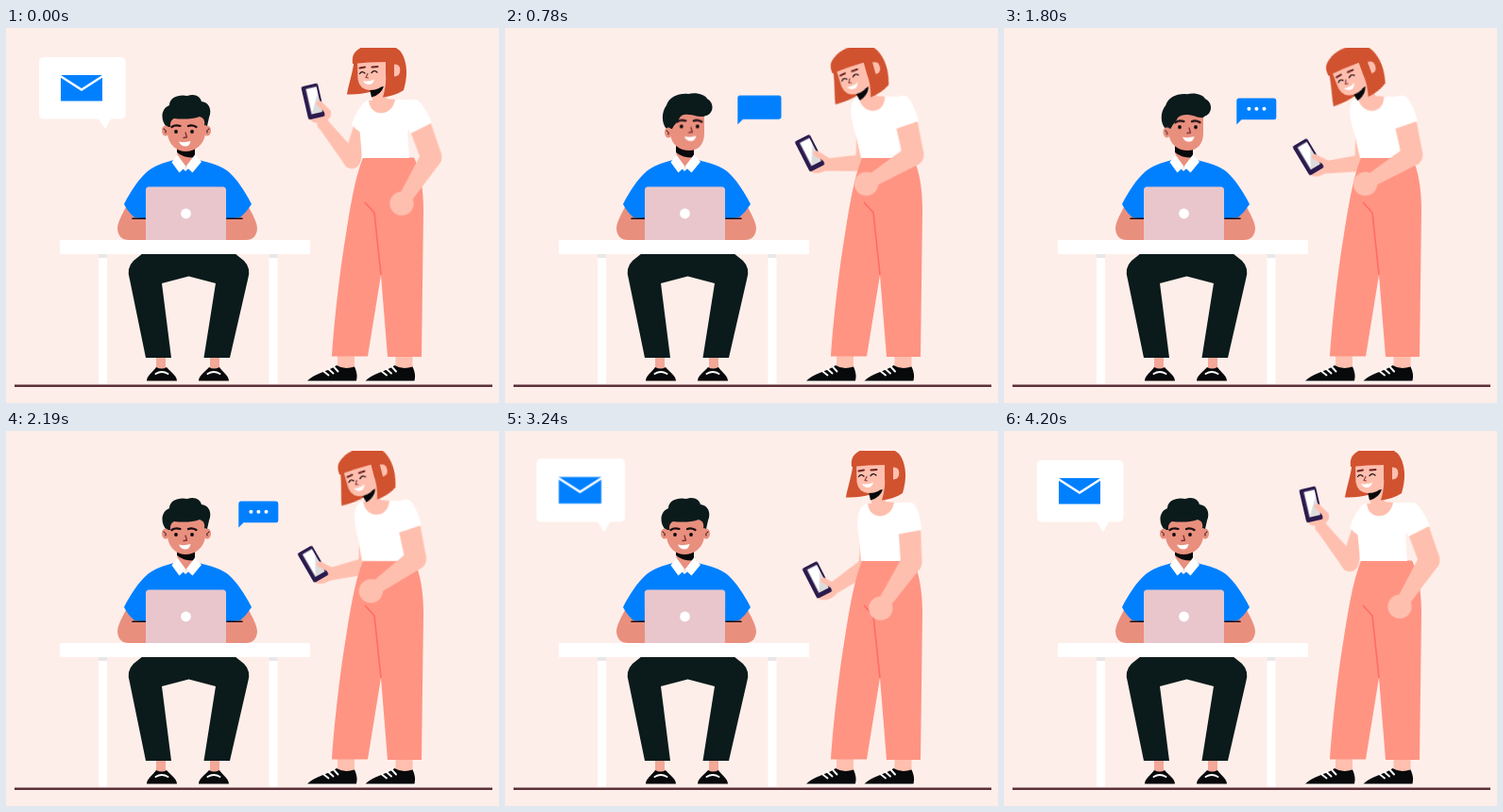
Recreate the animation shown at these times as an HTML page. Size 522 by 398 pixels, loop 4.5 s.

```html
<!DOCTYPE html>
<html lang="en">
<head>
<meta charset="utf-8">
<title>Two people messaging</title>
<style>
html, body { margin: 0; width: 100%; height: 100%; overflow: hidden; background: #feeee9; }
svg { display: block; width: 100vw; height: 100vh; }
.white { fill: #fff; }
.blue { fill: #0080ff; }
.ink { fill: #08090b; }
.dark { fill: #0b1a1b; }
.tan { fill: #e98f7e; }
.skin { fill: #ffbfae; }
.hair { fill: #d1522f; }
.line { fill: none; stroke: #1a0d12; stroke-width: 1.6; stroke-linecap: round; stroke-linejoin: round; }
.lace { fill: none; stroke: #fff; stroke-width: 1.9; stroke-linecap: round; }

.mail, .chat, .dot, .head, .torso, .armR, .foreR, .armL, .foreL, .phone,
.look, .hairM, .faceM, .earL, .earR, .lid, .cuff {
  animation: 4.5s ease-in-out infinite;
}

/* speech bubbles */
.mail { animation-name: mail; transform-origin: 102px 100px; }
@keyframes mail {
  0%, 7% { transform: scale(1); }
  12.4% { transform: scale(1.1); animation-timing-function: ease-in; }
  16.5%, 66.5% { transform: scale(0); animation-timing-function: ease-out; }
  73.5% { transform: scale(1.1); }
  86%, 100% { transform: scale(1); }
}
.chat { animation-name: chat; transform-origin: 246px 103px; }
@keyframes chat {
  0%, 13% { transform: scale(0); animation-timing-function: ease-out; }
  17.3% { transform: scale(1.1); }
  23%, 61% { transform: scale(1); }
  64% { transform: scale(1.1); animation-timing-function: ease-in; }
  67.5%, 100% { transform: scale(0); }
}
.dot { animation-name: dot; animation-fill-mode: backwards; transform-box: fill-box; transform-origin: center; }
.dot:nth-of-type(2) { animation-delay: 80ms; }
.dot:nth-of-type(3) { animation-delay: 160ms; }
@keyframes dot {
  0%, 20.5% { transform: scale(0); }
  23.5%, 100% { transform: scale(1); }
}

/* woman */
.head { animation-name: head; transform-origin: 395px 65px; }
@keyframes head {
  0%, 4% { transform: translate(0px, 0px) rotate(0deg); }
  17.4% { transform: translate(-14px, 1.5px) rotate(-16deg); }
  28%, 40% { transform: translate(-16px, 1.5px) rotate(-20deg); animation-timing-function: ease-in; }
  48.7% { transform: translate(-8px, .5px) rotate(-14.5deg); animation-timing-function: ease-out; }
  57.8%, 100% { transform: translate(0px, 0px) rotate(0deg); }
}
.torso { animation-name: torso; transform-origin: 0 138px; }
@keyframes torso {
  0%, 4.4% { transform: skewX(0deg) scaleY(1); }
  17.4%, 40% { transform: skewX(8.5deg) scaleY(1.05); animation-timing-function: ease-in; }
  48.7% { transform: skewX(5.5deg) scaleY(1.03); animation-timing-function: ease-out; }
  57.8%, 100% { transform: skewX(0deg) scaleY(1); }
}
.armR { animation-name: armR; }
@keyframes armR {
  0%, 4.4%, 92.5%, 100% { transform: translate(434px, 90px) rotate(-18.8deg); }
  17.4%, 40% { transform: translate(422.5px, 86px) rotate(-11deg); animation-timing-function: ease-in; }
  48.7% { transform: translate(424.5px, 87px) rotate(-10.5deg); animation-timing-function: ease-out; }
  57.8%, 73% { transform: translate(428px, 90px) rotate(-2.3deg); }
}
.foreR { animation-name: foreR; }
@keyframes foreR {
  0%, 4.4%, 92.5%, 100% { transform: translate(0px, 50px) rotate(51.2deg); }
  17.4%, 40% { transform: translate(0px, 50px) rotate(69.5deg); animation-timing-function: ease-in; }
  48.7% { transform: translate(0px, 50px) rotate(65px); transform: translate(0px, 50px) rotate(65deg); animation-timing-function: ease-out; }
  57.8%, 73% { transform: translate(0px, 50px) rotate(36deg); }
}
.armL { animation-name: armL; }
@keyframes armL {
  0%, 4.4%, 92.5%, 100% { transform: translate(380px, 92px) rotate(16deg); }
  17.4%, 40% { transform: translate(380.5px, 93px) rotate(0deg); animation-timing-function: ease-in; }
  48.7% { transform: translate(383px, 93px) rotate(1deg); animation-timing-function: ease-out; }
  57.8%, 73% { transform: translate(386px, 93px) rotate(3deg); }
}
.foreL { animation-name: foreL; }
@keyframes foreL {
  0%, 4.4%, 92.5%, 100% { transform: translate(0px, 50px) rotate(125.5deg); }
  17.4% { transform: translate(0px, 50px) rotate(87deg); }
  28%, 40% { transform: translate(0px, 50px) rotate(83deg); animation-timing-function: ease-in; }
  48.7% { transform: translate(0px, 50px) rotate(76deg); animation-timing-function: ease-out; }
  57.8%, 73% { transform: translate(0px, 50px) rotate(53deg); }
}
.phone { animation-name: phone; }
@keyframes phone {
  0%, 4.4%, 92.5%, 100% { transform: translate(-6.5px, 74.2px) rotate(-154.5deg); }
  17.4%, 40% { transform: translate(-13.2px, 57.2px) rotate(-114deg); animation-timing-function: ease-in; }
  48.7% { transform: translate(-14.5px, 55.2px) rotate(-107deg); animation-timing-function: ease-out; }
  57.8%, 73% { transform: translate(-17px, 52.3px) rotate(-83deg); }
}

/* man */
.look { animation-name: look; }
@keyframes look {
  0%, 6.7%, 48%, 100% { transform: translate(0px, 0px); }
  16%, 37.5% { transform: translate(6.8px, -5.5px); }
}
.earL { animation-name: earL; }
@keyframes earL {
  0%, 6.7%, 48%, 100% { transform: translate(0px, 0px); }
  16%, 37.5% { transform: translate(4px, 2px); }
}
.earR { animation-name: earR; }
@keyframes earR {
  0%, 6.7%, 48%, 100% { transform: translate(0px, 0px); }
  16%, 37.5% { transform: translate(-8px, -2px); }
}
.faceM { animation-name: faceM; }
@keyframes faceM {
  0%, 6.7%, 48%, 100% { d: path("M171 92L171 112C172 124 181 131 190 131C200 131 210 124 211 112L211 92Z"); }
  16%, 37.5% { d: path("M174 92L175 112C176 124 185 130 195 130C206 130 211 122 211 112L211 88Z"); }
}
.hairM { animation-name: hairM; }
@keyframes hairM {
  0%, 6.7%, 48%, 100% { d: path("M170 105C164 99 163 86 173 82C173 73 184 70 192 72C200 69 206 73 207 78C216 79 218 88 215 95L213 104L210 103C211 98 209 95 205 94C198 97 186 97 178 96C174 98 174 101 174 105Z"); }
  16%, 37.5% { d: path("M171 107C166 102 165 90 171 82C174 73 184 69 194 70C203 68 212 71 214 75C222 79 221 91 213 93L210 94L207 94C203 94 199 92 195 92C190 91 187 92 185 95C183 100 180 101 177 107Z"); }
}
.lid { animation-name: lid; }
@keyframes lid {
  0%, 49%, 74.5%, 100% { d: path("M148 172Q148 168.500 151.500 168.500L229.500 168.500Q233 168.500 233 172L233 225L148 225Z"); }
  57.5%, 62% { d: path("M145.500 173Q145.500 169.500 149 169.500L232 169.500Q235.500 169.500 235.500 173L232 224L149 224Z"); }
}
.cuff { animation-name: cuff; transform-origin: 134px 202px; }
@keyframes cuff {
  0%, 49%, 74.5%, 100% { transform: rotate(0deg); }
  57.5%, 62% { transform: rotate(-4deg); }
}
</style>
</head>
<body>
<svg viewBox="0 0 522 398" preserveAspectRatio="none">
  <defs>
    <clipPath id="crop"><rect y="21" width="522" height="377"/></clipPath>
    <g id="seatShoe">
      <path fill="#f3a898" d="M159 348h10v15h-10z"/>
      <path class="ink" d="M149 374.500C149 369 156 365 159 360Q165 363 170 360C174 365 181 369 181 374.500Z"/>
      <path class="lace" d="M158.500 367Q165 363 171.500 367"/>
    </g>
    <g id="walkShoe">
      <path class="skin" d="M351 347h18v16h-18z"/>
      <path class="white" d="M319 374h53v1.500h-53z"/>
      <path class="ink" d="M319 374.500C326 367 340 365 350 358Q358 363 369 359.500C372 366 372 370 371 374.500Z"/>
      <path class="lace" d="M336.500 364.500l5 4M341.500 362l5 4.500M347 359.500l4.500 5"/>
    </g>
    <path id="manArm" class="tan" d="M127 190C124 196 118 206 118 213Q119 225 130 225H152V198Z"/>
    <path id="cuffLine" class="line cuff" d="M134 202.200H150"/>
  </defs>

  <path d="M9 379.700H515" stroke="#5c3038" stroke-width="2.400"/>

  <!-- mail bubble -->
  <g class="mail">
    <path class="white" d="M40 31H121Q126.500 31 126.500 36.500V91Q126.500 96.500 121 96.500H111L106 105.500Q105 107 104 105.500L98 96.500H40Q35 96.500 35 91V36.500Q35 31 40 31Z"/>
    <rect class="blue" x="58" y="50" width="44" height="27.500"/>
    <path d="M57.500 51L80 65.500L102.500 51" fill="none" stroke="#fff" stroke-width="2.400"/>
  </g>

  <!-- chat bubble -->
  <g class="chat">
    <path class="blue" d="M248.500 74.500H286Q288.300 74.500 288.300 77V95Q288.300 97.300 286 97.300H251.500L246.300 102.500V77Q246.300 74.500 248.500 74.500Z"/>
    <circle class="dot white" cx="259.400" cy="85.800" r="2"/>
    <circle class="dot white" cx="267.400" cy="85.800" r="2"/>
    <circle class="dot white" cx="275.500" cy="85.800" r="2"/>
  </g>

  <!-- seated man -->
  <use href="#seatShoe"/>
  <use href="#seatShoe" transform="translate(385 0) scale(-1 1)"/>
  <path class="dark" d="M145 239L135 247Q127 255 131 267L148 350H175L165 271L193.500 263.500L222 271L209.500 350H237L256 267Q260 255 252 247L242 239Z"/>

  <use href="#manArm"/>
  <use href="#manArm" transform="translate(384 0) scale(-1 1)"/>
  <path class="blue" d="M178 140C166 143 156 147 150 152C140 161 132 173 125 187Q129 195 136 201L150 203H232L248 201Q255 195 260 187C253 173 245 161 235 152C229 147 217 143 204 140L190 152Z"/>
  <use href="#cuffLine"/>
  <use href="#cuffLine" transform="translate(384 0) scale(-1 1)"/>

  <path class="tan" d="M181.500 118H200V137L190.500 148L181.500 137Z"/>
  <path class="ink" d="M181 125H200V137.500Q188 138 181 132Z"/>
  <path class="white" d="M181.500 134.500L175.500 142.500L183.500 153.500L190.500 147ZM200 134.500L207 142L197.500 153.500L190.500 147Z"/>

  <g class="earR">
    <ellipse class="tan" cx="213" cy="109" rx="4" ry="5.500"/>
    <path class="line" style="stroke-width:1" d="M215 107Q212 108 213 111"/>
  </g>
  <path class="faceM tan" d="M171 92L171 112C172 124 181 131 190 131C200 131 210 124 211 112L211 92Z"/>
  <g class="look">
    <path class="line" style="stroke-width:2.200" d="M175.500 105Q179 102.500 184.500 104M193 104Q197 102.500 201.500 105"/>
    <circle class="ink" cx="180" cy="110" r="1.900"/>
    <circle class="ink" cx="197" cy="110" r="1.900"/>
    <path class="line" style="stroke:#7a2f36;stroke-width:1.300" d="M190 111L191.500 116L188 116.500"/>
    <path class="white" d="M183 120.500Q189 122 195.500 120Q194.500 125.500 190 125.500Q185 125.500 183 120.500Z"/>
  </g>
  <path class="hairM dark" d="M170 105C164 99 163 86 173 82C173 73 184 70 192 72C200 69 206 73 207 78C216 79 218 88 215 95L213 104L210 103C211 98 209 95 205 94C198 97 186 97 178 96C174 98 174 101 174 105Z"/>
  <g class="earL">
    <ellipse class="tan" cx="169" cy="109" rx="4" ry="5.500"/>
    <path class="line" style="stroke-width:1" d="M167 107Q170 108 169 111"/>
  </g>

  <!-- desk and laptop -->
  <path class="white" d="M57 225H322V240H57ZM98 240h9V378h-9zM278.500 240h9V378h-9z"/>
  <path fill="#e9e7e7" d="M98 240h9v4h-9zM278.500 240h9v4h-9z"/>
  <path class="lid" fill="#e8c6cc" d="M148 172Q148 168.500 151.500 168.500L229.500 168.500Q233 168.500 233 172L233 225L148 225Z"/>
  <circle class="white" cx="190.500" cy="197" r="5.400"/>

  <!-- standing woman -->
  <g clip-path="url(#crop)">
    <g class="armL">
      <path class="skin" d="M-8 10H8L9 50H-9Z"/>
      <path class="white" d="M-3 -12Q-10 -4 -10.500 14Q-2 20 9 20L10 -10Z"/>
      <g class="foreL">
        <circle class="skin" r="9.300"/>
        <path class="skin" d="M-9 0L-6 50H6L9 0Z"/>
        <circle class="skin" cy="49" r="6.500"/>
        <g class="phone">
          <ellipse class="skin" cx="4" cy="16.500" rx="11.500" ry="7.500"/>
          <rect x="-9" y="-18" width="18" height="36" rx="2" fill="#2b1b4d"/>
          <rect class="white" x="-4.500" y="-14.500" width="11.500" height="27.500"/>
          <path fill="#dcdcdc" d="M7 -8V13H-4.500Z"/>
          <path d="M6 3.500L13 14.500" stroke="#ffbfae" stroke-width="6" stroke-linecap="round"/>
        </g>
      </g>
    </g>

    <use href="#walkShoe"/>
    <use href="#walkShoe" x="61.500"/>
    <path fill="#ff9483" d="M378 137.500H432C439 151 442 172 442 193L440 349H404L397 262L383 348.500H345C348 305 354 255 359 225C364 193 369 160 378 137.500Z"/>
    <path d="M380 185L390 196L397 262" fill="none" stroke="#ff6c63" stroke-width="1.600"/>

    <g class="torso">
      <path class="skin" d="M387 58L403 56V75L413 76Q410 92 397 92Q386 92 384 77L388 77Z"/>
      <path class="white" d="M384 76.500C385 95 409 95 412 76L430 76Q436 82 434 95L425 110L427 138H377L375 114Q371 92 376 83Q378 78.500 384 76.500Z"/>
    </g>

    <g class="head">
      <path class="hair" d="M369 30C368 46 363 58 361 70.500Q375 71 387 67.500L382 30Z"/>
      <path class="ink" d="M385 64.500L400 62Q397 71 387 73.500Z"/>
      <path class="skin" d="M372 34H404L402 57Q397 66 385 66Q374 65 372.500 54Z"/>
      <path class="line" style="stroke:#6b2426;stroke-width:2" d="M374.500 42.500L380 41.500M387.500 41.500L393.500 41"/>
      <path class="line" style="stroke-width:1.200" d="M374.500 48.500Q377 45 380 48M387 47.500Q390 44 393 47"/>
      <path class="line" style="stroke:#8d3b3c;stroke-width:1.200" d="M383 48.500L381 52.500L383.500 53"/>
      <path class="white" d="M378 56Q384 57.500 390 54.500Q388.500 60 384 60Q380 60 378 56Z"/>
      <path class="hair" d="M367 38C366 29 369 25 374 22C384 14 406 14 417 24C425 34 426 50 421 66Q412 72 399 73.500Q403 60 402 50L402 36Q384 36 367 38Z"/>
      <path class="skin" d="M411 38.500Q417.500 38 417.300 45Q417 51.500 411 51.500Z"/>
    </g>

    <g class="armR">
      <path class="skin" d="M-12 12H11.500V50H-11Z"/>
      <path class="white" d="M-12 -10Q0 -18 6 -12Q11 -4 12.700 15.500L-12.700 19Z"/>
      <g class="foreR">
        <circle class="skin" r="11.300"/>
        <path class="skin" d="M-11.200 0L-7 52H7L11.200 0Z"/>
        <circle class="skin" cy="58" r="12.600"/>
      </g>
    </g>
  </g>
</svg>
</body>
</html>
```
